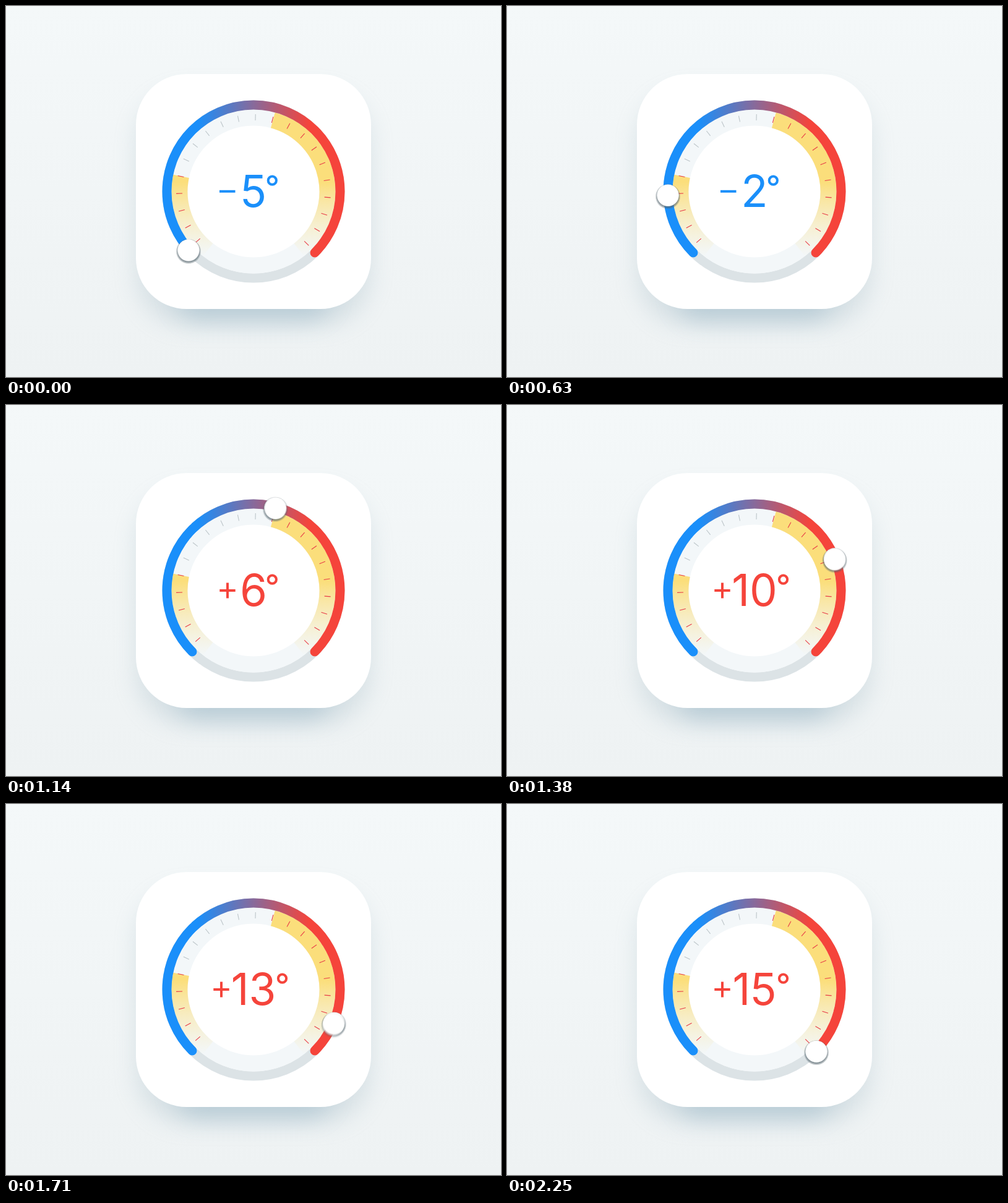
These frames come from a looping animation (800 by 600 pixels, 3 s). An HTML page:

```html
<!DOCTYPE html>
<html lang="en">
<head>
<meta charset="utf-8">
<title>Thermostat dial</title>
<style>
  html, body { margin: 0; width: 100%; height: 100%; overflow: hidden; background: #f1f5f6; }
  svg { display: block; width: 100vw; height: 100vh; }
  #digits { font: 400 71px Inter, "Liberation Sans", sans-serif; text-anchor: middle; }
  .line { fill: none; stroke: currentColor; stroke-width: 4; }
</style>
</head>
<body>
<svg viewBox="0 0 800 600">
  <defs>
    <linearGradient id="sky" x2="0" y2="1">
      <stop stop-color="#f4f8f9"/><stop offset="1" stop-color="#eef2f3"/>
    </linearGradient>
    <linearGradient id="heat" gradientUnits="userSpaceOnUse" x1="310" x2="490" y1="0" y2="0">
      <stop stop-color="#1a8ffa"/><stop offset="1" stop-color="#f5443b"/>
    </linearGradient>
    <linearGradient id="glow" gradientUnits="userSpaceOnUse" x1="0" x2="0" y1="285" y2="405">
      <stop stop-color="#fbde7b"/><stop offset="1" stop-color="#fbe8a8" stop-opacity="0"/>
    </linearGradient>
    <radialGradient id="shade">
      <stop offset=".78" stop-color="#5a6a72" stop-opacity=".42"/>
      <stop offset="1" stop-color="#5a6a72" stop-opacity="0"/>
    </radialGradient>
    <filter id="soft" x="-50%" y="-50%" width="200%" height="200%"><feGaussianBlur stdDeviation="18"/></filter>
    <g id="knob">
      <circle cy="1.7" r="20.5" fill="url(#shade)"/>
      <circle r="17.5" fill="#fff"/>
    </g>
  </defs>

  <rect width="800" height="600" fill="url(#sky)"/>
  <rect x="210" y="137" width="380" height="380" rx="82" fill="#8faab8" opacity=".25" filter="url(#soft)"/>
  <rect x="275" y="400" width="250" height="108" rx="40" fill="#7fa5ba" opacity=".34" filter="url(#soft)"/>
  <rect x="210" y="110" width="380" height="380" rx="82" fill="#fff"/>

  <g fill="none">
    <circle cx="400" cy="300" r="140" stroke="#dce3e6" stroke-width="15"/>
    <circle cx="400" cy="300" r="119.5" stroke="#f3f7f9" stroke-width="26"/>
    <g id="zones" stroke="url(#glow)" stroke-width="26"></g>
    <path id="scale" stroke="url(#heat)" stroke-width="15" stroke-linecap="round"/>
    <g id="ticks" stroke-width="1.1"></g>
  </g>

  <g id="readout">
    <path id="sign" class="line"/>
    <text id="digits" y="325" fill="currentColor"></text>
    <circle id="degree" class="line" cy="282.2" r="6.6"/>
  </g>
  <g id="knobs"></g>
</svg>

<script>
const $ = id => document.getElementById(id);
const LOOP = 3000, FRAME = 30, START = 120, SHUTTER = 15, GHOSTS = 12;
const FIRST = -131.4, STEP = 13.29, LOWEST = -5;
// Time spent on each degree: slow, fast, slow.
const STEPS = [240, 150, 120, 90, ...Array(12).fill(60), 90, 120, 150, 450];

const angle = n => FIRST + STEP * n;

// Point at a clockwise angle from the top.
function polar(deg, r, cy = 300) {
  const a = deg * Math.PI / 180;
  return [400 + r * Math.sin(a), cy - r * Math.cos(a)];
}

function arc(from, to, r) {
  return `M${polar(from, r)}A${r} ${r} 0 ${to - from > 180 ? 1 : 0} 1 ${polar(to, r)}`;
}

function add(parent, tag, attrs) {
  const el = document.createElementNS("http://www.w3.org/2000/svg", tag);
  for (const key in attrs) el.setAttribute(key, attrs[key]);
  return parent.appendChild(el);
}

$("scale").setAttribute("d", arc(-135, 135, 140));
add($("zones"), "path", { d: arc(-142, -78.1, 119.5) });
add($("zones"), "path", { d: arc(15.2, 142, 119.5) });

const isMild = n => n > 4 && n < 11;
for (let n = 0; n <= STEPS.length; n++) {
  const deg = angle(n);
  add($("ticks"), "path", {
    d: `M${polar(deg, 115)}L${polar(deg, 125)}`,
    stroke: isMild(n) ? "#bcc5c9" : "#e83c48"
  });
}

// Falling opacities blend the copies into an even motion blur.
const ghosts = Array.from({ length: GHOSTS }, (_, i) =>
  add($("knobs"), "use", { href: "#knob", opacity: 1 / (i + 1) }));

// Dial position in degrees of temperature, easing to a stop on each one.
function position(t) {
  let left = t - START;
  if (left <= 0) return 0;
  for (let n = 0; n < STEPS.length; n++) {
    if (left < STEPS[n]) {
      const u = left / STEPS[n];
      return n + u * u * (3 - 2 * u);
    }
    left -= STEPS[n];
  }
  return STEPS.length;
}

function drawReadout(n) {
  const value = n + LOWEST;
  const wide = Math.abs(value) > 9;
  const x = wide ? 348 : 358;
  const plus = `M${x - 12.7} 300h25.4M${x} 287.5v25`;
  const minus = `M${x - 13} 299.8h25.5`;
  $("readout").style.color = isMild(n) ? "#2b3838" : value < 0 ? "#1a8ffa" : "#f5443b";
  $("sign").setAttribute("d", value > 0 ? plus : value < 0 ? minus : "");
  $("digits").setAttribute("x", 400);
  $("digits").textContent = Math.abs(value);
  $("degree").setAttribute("cx", wide ? 446.5 : 430.3);
}

function draw(t) {
  drawReadout(Math.floor(position(t)));
  ghosts.forEach((ghost, i) => {
    const shift = ((i + 0.5) / GHOSTS - 0.5) * SHUTTER;
    const [x, y] = polar(angle(position(t + shift)), 140, 302.5);
    ghost.setAttribute("transform", `translate(${x.toFixed(2)} ${y.toFixed(2)})`);
  });
}

const begin = performance.now();
function tick() {
  const t = (performance.now() - begin) % LOOP;
  draw(Math.floor(t / FRAME) * FRAME);
  requestAnimationFrame(tick);
}
tick();
</script>
</body>
</html>
```
